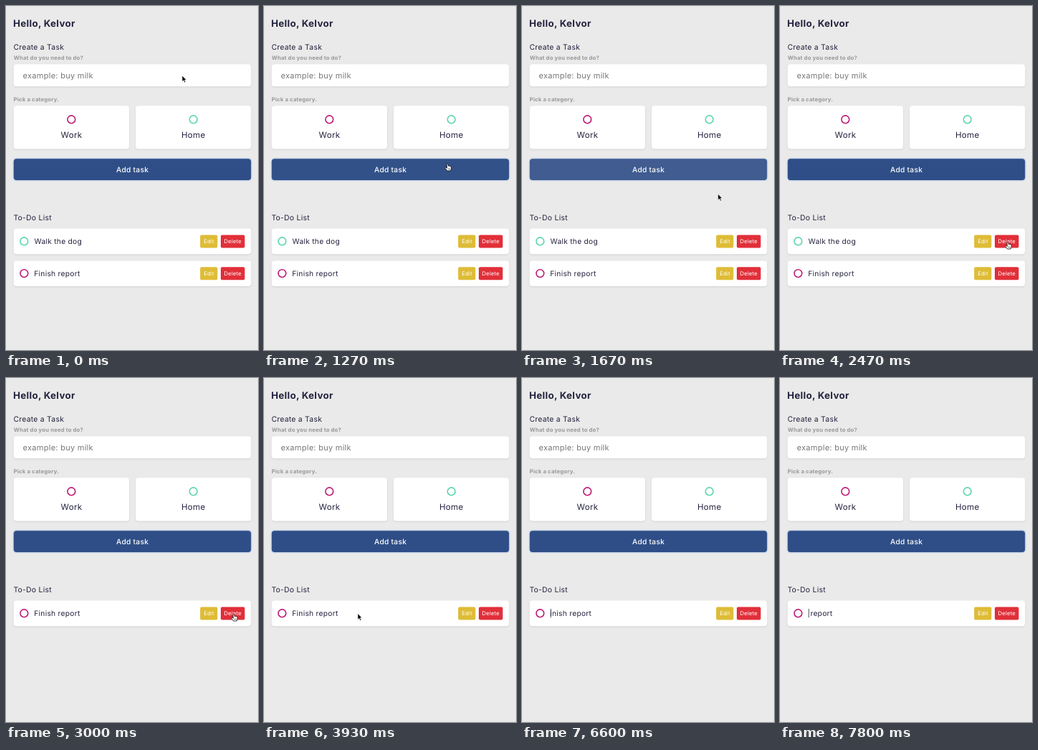
Recreate the animation shown at these times as an HTML page. Size 352 by 480 pixels, loop 8000 ms.

```html
<!DOCTYPE html>
<html lang="en">
<head>
<meta charset="utf-8">
<title>To-Do List</title>
<style>
html, body { margin: 0; width: 100%; height: 100%; overflow: hidden; background: #eaeaea; }
svg { display: block; width: 100vw; height: 100vh; }
text {
  font: 10.25px Inter, "Open Sans", sans-serif;
  letter-spacing: .025em;
  fill: #23233f;
  white-space: pre;
  text-rendering: geometricPrecision;
}
.mid { text-anchor: middle; }
.hello { font-size: 13.3px; font-weight: 700; }
.label { font-size: 7.7px; font-weight: 700; fill: #999; }
.hint { font-size: 11px; fill: #777; }
.choice { font-size: 11.6px; }
.head { font-size: 10.4px; }
.submit { font-weight: 500; fill: #fff; }
.small { font-size: 7.7px; fill: #fff; }
.card { fill: #fff; filter: drop-shadow(0 1px 1px rgba(0, 0, 0, .1)); }
.ring { fill: none; stroke-width: 1.6; }
.work { stroke: #bf1a75; }
.home { stroke: #5cd6b0; }
.edit { fill: #debc36; }
.delete { fill: #e12f39; }
.glow { filter: drop-shadow(0 0 1.2px rgba(70, 125, 215, .75)); }
</style>
</head>
<body>
<svg viewBox="0 0 352 480" preserveAspectRatio="none">
  <rect width="352" height="480" fill="#eaeaea"/>
  <text class="hello" x="10" y="28.5">Hello, Kelvor</text>
  <text class="head" x="10.4" y="60.6">Create a Task</text>
  <text class="label" x="10.8" y="75">What do you need to do?</text>
  <rect class="card" x="10.7" y="81.3" width="331.6" height="31" rx="4"/>
  <text class="hint" x="23.6" y="101">example: buy milk</text>
  <text class="label" x="10.6" y="133.2">Pick a category.</text>
  <rect class="card" x="10.7" y="139.3" width="161.3" height="60.2" rx="4"/>
  <rect class="card" x="181" y="139.3" width="161.3" height="60.2" rx="4"/>
  <circle class="ring work" cx="91.3" cy="158.3" r="5.4"/>
  <circle class="ring home" cx="261.7" cy="158.3" r="5.4"/>
  <text class="choice mid" x="91.5" y="183.8">Work</text>
  <text class="choice mid" x="261.8" y="183.8">Home</text>
  <g id="add">
    <rect class="glow" x="10.8" y="213.2" width="331.4" height="29.8" rx="4" fill="#2f4e87"/>
    <text class="submit mid" x="176.6" y="231.9">Add task</text>
  </g>
  <text class="head" x="10.4" y="299">To-Do List</text>

  <g id="first">
    <rect class="card" x="10.7" y="310.6" width="331.6" height="35.6" rx="4"/>
    <circle class="ring home" cx="25.3" cy="328.3" r="5.4"/>
    <text x="39.6" y="331.9">Walk the dog</text>
    <g id="actions">
      <rect class="edit" x="271.2" y="319.5" width="24.2" height="18" rx="2"/>
      <text class="small mid" x="283.4" y="331">Edit</text>
      <rect class="delete" x="300" y="319.5" width="33.5" height="18" rx="2"/>
      <text class="small mid" x="316.8" y="331">Delete</text>
    </g>
  </g>
  <g id="second">
    <rect class="card" x="10.7" y="310.6" width="331.6" height="35.6" rx="4"/>
    <circle class="ring work" cx="25.3" cy="328.3" r="5.4"/>
    <text id="task" x="39.3" y="331.9">Finish report</text>
    <use href="#actions"/>
    <path id="caret" d="M40.2 322V334.4" stroke="#23233f" stroke-width=".8"/>
  </g>

  <g id="arrow">
    <path d="M0 0V8.6L2 6.8L3.4 9.9L4.9 9.2L3.5 6.2H6.1Z" fill="#000" stroke="#fff" stroke-width=".7" stroke-linejoin="round"/>
  </g>
  <g id="hand">
    <path d="M-.9 .5Q0 -.5 .9 .5L1.3 3.4Q2.2 2.8 2.9 3.6Q3.8 3.2 4.4 4.1Q5.5 4 5.6 5.2Q5.6 7.4 4.5 10H-.4Q-1.2 8.3 -3 6.4Q-3.5 5.2 -2.4 5.1L-.4 6.3Z" fill="#fff" stroke="#000" stroke-width=".75" stroke-linejoin="round"/>
    <path d="M1.1 6.6V8.5M2.3 6.6V8.5M3.5 6.6V8.5" stroke="#000" stroke-width=".45"/>
  </g>
  <g id="beam" fill="none">
    <path d="M-2 -4.8Q0 -4.8 0 -3.7Q0 -4.8 2 -4.8M0 -3.7V3.9M-2 5Q0 5 0 3.9Q0 5 2 5M-1.2 1.5H1.2" stroke="#222" stroke-width=".9"/>
  </g>
</svg>
<script>
const LOOP = 8000, STEP = 200 / 3;
const el = id => document.getElementById(id);
const show = (id, on) => { el(id).style.display = on ? "" : "none"; };
const clamp = v => Math.min(1, Math.max(0, v));

// Pointer path: time, x, y
const path = [
  [0, 246, 97], [600, 246, 97], [1267, 256, 219.5], [1467, 262.5, 234],
  [1667, 273.5, 261.8], [2333, 311, 326.5], [2467, 317.8, 329],
  [3133, 317.8, 329], [3667, 64, 323], [3933, 129.6, 328.6],
  [4333, 281, 329], [4467, 282.5, 328], [4533, 283, 327.5],
  [4600, 283, 327.5], [5200, 57, 328], [5467, 51.5, 328],
  [5600, 50.5, 327.5], [LOOP, 50.5, 327.5]
];
const typed = "Finish report";
const strokes = [6530, 6800, 7070, 7270, 7470, 7800];
const caretOn = [[4800, 5300], [5800, 6330], [6530, LOOP]];

const slope = (i, k) => (path[i + 1][k] - path[i][k]) / (path[i + 1][0] - path[i][0]);

// Harmonic mean of neighbouring slopes: smooth, never overshoots
function tangent(i, k) {
  if (i === 0 || i === path.length - 1) return 0;
  const a = slope(i - 1, k), b = slope(i, k);
  return a * b > 0 ? 2 * a * b / (a + b) : 0;
}

function pointerAt(t) {
  let i = 0;
  while (i < path.length - 2 && t >= path[i + 1][0]) i++;
  const [t0] = path[i], d = path[i + 1][0] - t0, u = clamp((t - t0) / d);
  const v = u * u * (3 - 2 * u);
  return [1, 2].map(k =>
    path[i][k] * (1 - v) + path[i + 1][k] * v +
    d * u * (1 - u) * ((1 - u) * tangent(i, k) - u * tangent(i + 1, k)));
}

function pointerKind(t, x, y) {
  const within = (l, r, top, bottom) => x > l && x < r && y > top && y < bottom;
  const clickable = within(181, 342, 139, 200) || within(11, 342, 213, 243) ||
    within(271, 296, 319, 338) || within(300, 334, 319, 338);
  if (clickable) return "hand";
  return t > 4600 && x < 265 ? "beam" : "arrow";
}

function draw(time) {
  const t = Math.floor((time + 4) / STEP) * STEP + 4;

  const hover = clamp((t - 1255) / 200) - clamp((t - 1545) / 200);
  el("add").style.opacity = 1 - .25 * hover;

  const removed = t >= 2800;
  show("first", !removed);
  el("second").setAttribute("transform", `translate(0 ${removed ? 0 : 44.8})`);

  el("task").textContent = typed.slice(strokes.filter(s => t >= s).length);
  show("caret", caretOn.some(([a, b]) => t >= a && t < b));

  const [x, y] = pointerAt(t);
  const kind = t < 5866 ? pointerKind(t, x, y) : "";
  for (const id of ["arrow", "hand", "beam"]) {
    show(id, id === kind);
    el(id).setAttribute("transform", `translate(${x} ${y})`);
  }
}

const start = performance.now();
function tick() {
  draw((performance.now() - start) % LOOP);
  requestAnimationFrame(tick);
}
tick();
</script>
</body>
</html>
```
